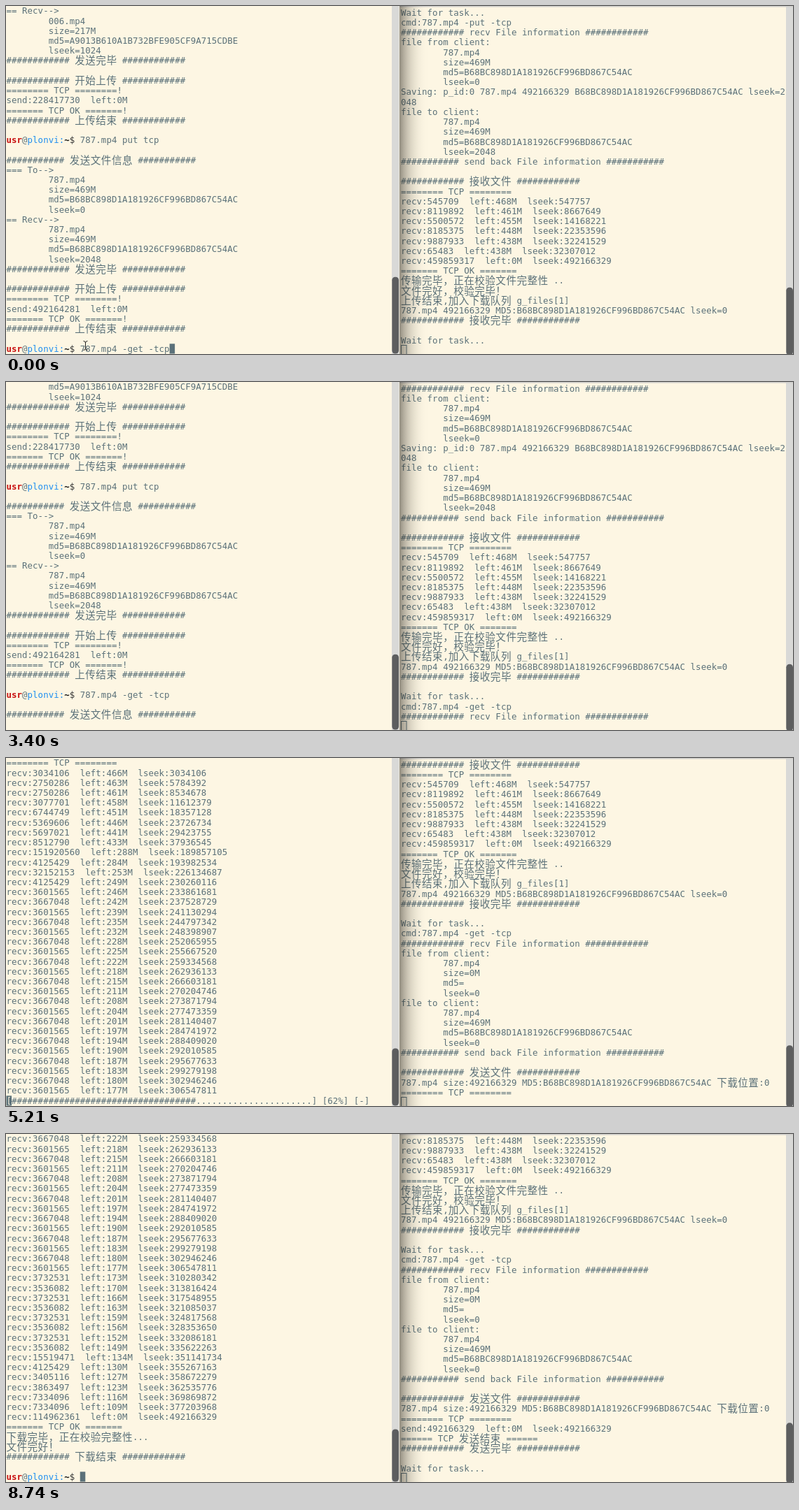
An HTML page with a canvas that plays this animation: 1124x498 px, repeating every 8.96 s.

```html
<!DOCTYPE html>
<html lang="zh">
<head>
<meta charset="utf-8">
<title>Terminals</title>
<style>
  html, body { margin: 0; width: 100%; height: 100%; overflow: hidden; background: #fdf6e3; }
  canvas { display: block; }
</style>
</head>
<body>
<canvas id="stage" width="1124" height="498"></canvas>
<script>
(() => {
const ctx = document.getElementById('stage').getContext('2d');
const LOOP = 8960, TICK = 121, W = 1124, H = 498;
const CELL = 7.52, ROW = 14.21, ROWS = 35;
const PAPER = '#fdf6e3', INK = '#5b7179';
const LATIN = '12.4px "DejaVu Sans Mono", monospace';
const HAN = '14.6px "Noto Sans CJK SC", "Noto Sans CJK", sans-serif';
const TOTAL = 492166329, PACKET = 65483, MEGA = 2 ** 20;
const HASH = 'B68BC898D1A181926CF996BD867C54AC';

// Log text
const title = (text, n = 12) => `${'#'.repeat(n)} ${text} ${'#'.repeat(n)}`;
const tcp = (text = 'TCP', n = 8) => `${'='.repeat(n)} ${text} ${'='.repeat(n)}`;
const fileInfo = (name, size, md5, seek) =>
  [name, `size=${size}M`, `md5=${md5}`, `lseek=${seek}`].map(s => ' '.repeat(8) + s);
const clip = (seek, size = 469, md5 = HASH) => fileInfo('787.mp4', size, md5, seek);
const shell = command => ({ command });
const place = `787.mp4 size:${TOTAL} MD5:${HASH} 下载位置:0`;
const alternate = (n, a, b) => Array.from({ length: n }, (_, i) => i % 2 ? b : a);

// Chunks are whole packets after the first; the last one takes the remainder.
function receive(first, packets, seek = 0) {
  const entry = size => {
    seek += size;
    const left = Math.floor((TOTAL - seek) / MEGA);
    return { seek, text: `recv:${size}  left:${left}M  lseek:${seek}` };
  };
  const entries = [first, ...packets.map(n => n * PACKET)].map(entry);
  return [...entries, entry(TOTAL - seek)];
}

const download = receive(3034106, [
  42, 42, 47, 103, 82, 87, 130, 2320, 63, 491, 63,
  ...alternate(21, 55, 56), ...alternate(8, 57, 54), 237, 63, 52, 59, 112, 112
]);
const upload = receive(545709, [124, 84, 125, 151, 1], 2048);

const sent = bytes => [
  title('开始上传'), tcp() + '!', `send:${bytes}  left:0M`, tcp('TCP OK', 7) + '!', title('上传结束'), ''
];
const exchange = (to, from) => [
  title('发送文件信息', 11), '=== To-->', ...to, '== Recv-->', ...from, title('发送完毕'), ''
];

const client = [
  '== Recv-->', ...fileInfo('006.mp4', 217, 'A9013B610A1B732BFE905CF9A715CDBE', 1024),
  title('发送完毕'), '', ...sent(228417730),
  shell('787.mp4 put tcp'), '', ...exchange(clip(0), clip(2048)), ...sent(492164281),
  shell('787.mp4 -get -tcp'), '', ...exchange(clip(0, 0, ''), clip(0)),
  title('开始下载'), place, 'mkdir /home/qu/client/download/',
  'location: /home/qu/client/download/787.mp4', tcp(),
  ...download.map(d => d.text),
  tcp('TCP OK', 7), '下载完毕，正在校验完整性...', '文件完好！', title('下载结束'), '',
  shell('')
];

const server = [
  'Wait for task...', 'cmd:787.mp4 -put -tcp',
  title('recv File information'), 'file from client:', ...clip(0),
  `Saving: p_id:0 787.mp4 ${TOTAL} ${HASH} lseek=2`, '048',
  'file to client:', ...clip(2048), title('send back File information', 11), '',
  title('接收文件'), tcp(), ...upload.map(d => d.text),
  tcp('TCP OK', 7), '传输完毕，正在校验文件完整性 ..', '文件完好，校验完毕！',
  '上传结束,加入下载队列 g_files[1]', `787.mp4 ${TOTAL} MD5:${HASH} lseek=0`,
  title('接收完毕'), '',
  'Wait for task...', 'cmd:787.mp4 -get -tcp',
  title('recv File information'), 'file from client:', ...clip(0, 0, ''),
  'file to client:', ...clip(0), title('send back File information', 11), '',
  title('发送文件'), place, tcp(),
  `send:${TOTAL}  left:0M  lseek:${TOTAL}`, tcp('TCP 发送结束', 6), title('发送完毕'), '',
  'Wait for task...'
];

// Timeline, in ticks
const LOADING = 38, LOADED = 50;
const LAST_SCROLL = client.length - ROWS;

function receivedAt(tick) {
  const d = tick - 40;
  if (d < 0) return 8;
  return Math.min(9 + 8 * d, Math.round(35 + 1.5 * d), download.length - 1);
}

function clientScroll(tick) {
  if (tick < 14) return 0;
  if (tick < 22) return 1;
  if (tick < 30) return 3;
  if (tick < LOADING) return 20;
  if (tick < LOADED) return 20 + receivedAt(tick);
  return tick < 63 ? LAST_SCROLL - 3 : LAST_SCROLL;
}

const serverScroll = tick => tick < 22 ? 0 : tick < 30 ? 2 : tick < 49 ? 17 : 22;

// The cursor blinks every five ticks; new output restarts it.
function cursorOn(tick) {
  const start = tick < 14 ? -2 : tick < 57 ? 13 : 52;
  return Math.floor((tick - start) / 5) % 2 === 0;
}

// Drawing
function drawText(text, x, y, color = INK, bold = false) {
  ctx.fillStyle = color;
  for (const ch of text) {
    const wide = ch > '\u2e7f';
    if (ch !== ' ') {
      ctx.font = wide ? HAN : (bold ? 'bold ' : '') + LATIN;
      ctx.fillText(ch, x, y + (wide ? 12.2 : 11.2));
    }
    x += wide ? CELL * 2 : CELL;
  }
  return x;
}

function drawLine(line, x, y) {
  if (typeof line === 'string') return drawText(line, x, y);
  x = drawText('usr', x, y, '#c80f0f', true);
  x = drawText('@', x, y);
  x = drawText('plonvi:', x, y, '#1e8ef0');
  x = drawText('~', x, y, '#111', true);
  x = drawText('$ ', x, y, '#333');
  drawText(line.command, x, y);
}

function drawLog(log, scroll, count, x, y) {
  log.slice(scroll, scroll + count).forEach((line, i) => drawLine(line, x, y + i * ROW));
}

function progressBar(received) {
  const percent = Math.floor(download[received - 1].seek / TOTAL * 100);
  const done = Math.floor(57 * percent / 100);
  return `[${'#'.repeat(done)}${'.'.repeat(57 - done)}] [${percent}%] [${'|/-\\'[percent % 4]}]`;
}

function drawScrollbar(x, bottom, history) {
  const size = bottom * ROWS / history;
  ctx.fillStyle = '#d9d9d7';
  ctx.fillRect(x, 0, 10.5, H);
  ctx.fillStyle = '#5d5e5f';
  ctx.beginPath();
  ctx.roundRect(x + 0.3, bottom - size, 9.7, size - 0.5, 4.5);
  ctx.fill();
}

function drawClient(tick) {
  const x = 0.5, y = 0.2, lastY = y + (ROWS - 1) * ROW;
  const scroll = clientScroll(tick);
  const ready = scroll === 0 || scroll === LAST_SCROLL;
  const loading = tick >= LOADING && tick < LOADED;
  drawLog(client, scroll, ready ? ROWS : ROWS - 1, x, y);
  if (loading) drawText(progressBar(receivedAt(tick)), x, lastY);

  if (cursorOn(tick)) {
    const column = scroll === 0 ? 31 : ready ? 14 : 0;
    ctx.fillStyle = INK;
    ctx.fillRect(x + column * CELL, lastY, CELL, ROW);
    if (loading) drawText('[', x, lastY, PAPER);
  }
  drawScrollbar(551, H, 158 + scroll);
}

function drawServer(tick) {
  const x = 564, y = 2.6;
  const scroll = serverScroll(tick);
  drawLog(server, scroll, ROWS - 1, x, y);
  ctx.strokeStyle = INK;
  ctx.lineWidth = 1;
  ctx.strokeRect(x + 0.5, 485.5, 7.5, 14);
  drawScrollbar(1114, 500, 180 + scroll);
  ctx.fillStyle = '#cfcecb';
  ctx.fillRect(562, 0, W - 562, 1.5);

  const shade = ctx.createLinearGradient(562, 0, 606, 0);
  for (let i = 0; i <= 8; i++) {
    shade.addColorStop(i / 8, `rgba(40,36,28,${0.5 * (1 - i / 8) ** 2.5})`);
  }
  ctx.fillStyle = shade;
  ctx.fillRect(562, 0, 44, H);
}

function drawPointer() {
  ctx.strokeStyle = '#222';
  ctx.lineWidth = 1;
  ctx.beginPath();
  for (const side of [-3, 3]) {
    ctx.moveTo(113.5 + side, 479.5);
    ctx.quadraticCurveTo(113.5, 479.5, 113.5, 482);
    ctx.lineTo(113.5, 490);
    ctx.quadraticCurveTo(113.5, 492.5, 113.5 + side, 492.5);
  }
  ctx.stroke();
}

function draw(now) {
  const tick = Math.floor(now % LOOP / TICK);
  ctx.fillStyle = PAPER;
  ctx.fillRect(0, 0, W, H);
  drawClient(tick);
  drawServer(tick);
  if (tick === 0) drawPointer();
}

const begin = performance.now();
function frame() {
  draw(performance.now() - begin);
  requestAnimationFrame(frame);
}
frame();
})();
</script>
</body>
</html>
```
